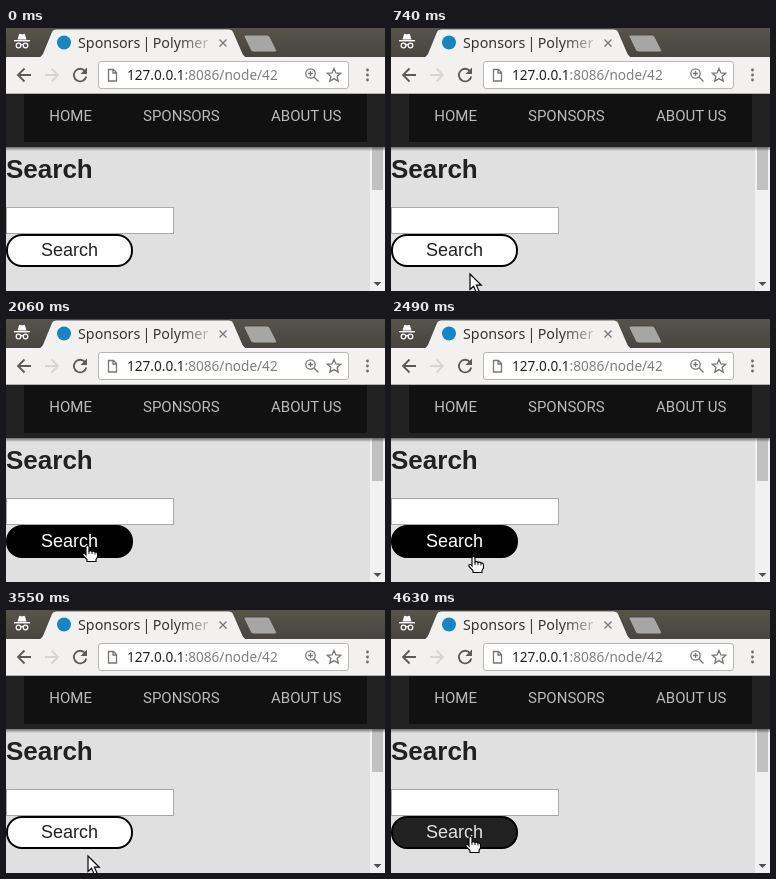
An HTML page for the animation above (4730 ms loop, 379x263 px).

```html
<!DOCTYPE html>
<html lang="en">
<head>
<meta charset="utf-8">
<title>Search button hover</title>
<style>
  html, body { margin: 0; width: 100%; height: 100%; overflow: hidden; background: #e0e0e0; }
  svg { display: block; width: 379px; height: 263px; }
  .ui { font-family: "Noto Sans", "Open Sans", sans-serif; }
  .title { font-size: 14.3px; word-spacing: -1.5px; }
  .nav { font: 15px Roboto, sans-serif; font-kerning: none; fill: #bbb; }
  .page { font-family: "Liberation Sans", Arial, sans-serif; }
  .icon { fill: none; stroke: #5a5a5a; stroke-width: 1.8; }
  .thin { stroke: #777; stroke-width: 1.3; }
  .off { stroke: #d6d5d4; }
</style>
</head>
<body>
<svg viewBox="0 0 379 263">
  <defs>
    <linearGradient id="bar" x2="0" y2="1">
      <stop stop-color="#57544b"/><stop offset="1" stop-color="#48453f"/>
    </linearGradient>
    <linearGradient id="titleFade" gradientUnits="userSpaceOnUse" x1="172" x2="206">
      <stop stop-color="#333"/><stop offset="1" stop-color="#333" stop-opacity=".15"/>
    </linearGradient>
    <linearGradient id="shadow" x2="0" y2="1">
      <stop stop-opacity=".5"/><stop offset="1" stop-opacity="0"/>
    </linearGradient>
  </defs>

  <!-- Window bar and tabs -->
  <rect width="379" height="29" fill="url(#bar)"/>
  <g transform="translate(0 1)">
    <path d="M11.5 10.500 13 5.500Q13.500 4.500 14.700 5L16 5.500 17.300 5Q18.500 4.500 19 5.500L20.500 10.500Z" fill="#fff"/>
    <rect x="8" y="11" width="16" height="1.400" fill="#fff"/>
    <g fill="none" stroke="#fff" stroke-width="1.300">
      <circle cx="12.500" cy="16.500" r="2.300"/><circle cx="19.500" cy="16.500" r="2.300"/>
      <path d="M14.800 16Q16 15 17.200 16"/>
    </g>
  </g>
  <path d="M238 8.500Q238 7 240 7H261Q263 7 264 9L270 21Q271.500 24 269 24H248Q245.500 24 244.500 22Z" fill="#a6a6a3" stroke="#44413b" stroke-width=".8"/>
  <path d="M31 30Q35 29 36.500 26L45.500 4Q47 1 50 1H223Q226 1 227.500 4L237 26Q238.500 29 242 30Z" fill="#f2f1f0" stroke="#3a3833" stroke-width=".8"/>
  <circle cx="58" cy="14.500" r="7" fill="#1685c4"/>
  <text class="ui title" x="72" y="19.500" fill="url(#titleFade)">Sponsors | Polymer</text>
  <path class="icon thin" d="M213.500 11.500 220.500 18.500M220.500 11.500 213.500 18.500"/>

  <!-- Toolbar -->
  <rect y="29" width="379" height="36" fill="#f2f1f0"/>
  <rect y="65" width="379" height="1" fill="#b5b2ad"/>
  <path class="icon" d="M25 47H12.500M18.500 40.500 12 47 18.500 53.500"/>
  <path class="icon off" d="M39 47H51.500M45.500 40.500 52 47 45.500 53.500"/>
  <path class="icon" d="M79 43A6.300 6.300 0 1 0 80.300 48.500"/>
  <path d="M81 39.500V46H74.500Z" fill="#5a5a5a"/>
  <rect x="92.500" y="33.500" width="250" height="27" rx="2.500" fill="#fff" stroke="#b9b6b2"/>
  <path class="icon thin" d="M102.500 41.500H107.500L110.500 44.500V53H102.500ZM107 42V45H110"/>
  <text class="ui" x="121" y="52" font-size="13.600" fill="#222">127.0.0.1<tspan fill="#808080">:8086/node/42</tspan></text>
  <g class="icon thin">
    <circle cx="304.500" cy="45.500" r="4.700"/>
    <path d="M308 49 312.500 53.500M302 45.500H307M304.500 43V48"/>
    <path d="M328 40.500 329.900 44.900 334.700 45.300 331.100 48.400 332.200 53.100 328 50.600 323.800 53.100 324.900 48.400 321.300 45.300 326.100 44.900Z"/>
  </g>
  <g fill="#6a6a6a">
    <circle cx="361.500" cy="42" r="1.400"/><circle cx="361.500" cy="47" r="1.400"/><circle cx="361.500" cy="52" r="1.400"/>
  </g>

  <!-- Page -->
  <rect y="66" width="379" height="197" fill="#e0e0e0"/>
  <rect x="364" y="119" width="15" height="144" fill="#f1f1f1"/>
  <rect x="366" y="119" width="11" height="43" fill="#c1c1c1"/>
  <path d="M367.500 254H375.500L371.500 258Z" fill="#505050"/>
  <rect y="119" width="379" height="4" fill="url(#shadow)"/>
  <rect y="66" width="379" height="53" fill="#222"/>
  <rect x="18" y="66" width="343" height="48" fill="#111"/>
  <g class="nav">
    <text x="43.300" y="93">HOME</text><text x="137" y="93">SPONSORS</text><text x="265" y="93">ABOUT US</text>
  </g>
  <g class="page">
    <text y="150" font-size="26" font-weight="700" fill="#212121">Search</text>
    <rect x=".5" y="179.500" width="167" height="26" fill="#fff" stroke="#a9a9a9"/>
    <rect id="button" x="1" y="207" width="125" height="31" rx="15" stroke="#000" stroke-width="2"/>
    <text id="label" x="35" y="228" font-size="18">Search</text>
  </g>

  <!-- Pointers, each with its hot spot at 0,0 -->
  <path id="arrow" d="M0 0V15.500L3.600 12.200 6.200 18.300 9 17.100 6.400 11.200H11.300Z" fill="#fff" stroke="#000" stroke-width="1.200"/>
  <g id="hand" stroke="#000">
    <path d="M-2 8V1Q-2 -.5 -.5 -.5T1 1V5Q3 4 4 5.500 6 4.500 7 6 9 5.500 9.500 7.500V11L8 13.500V15.500H-1V13.500L-5 9.500Q-5.500 7.500 -4 7.500 -3 7.500 -2 9Z" fill="#fff" stroke-width="1.100"/>
    <path d="M1 5V8M4 5.500V8M7 6V8.500" stroke-width=".9"/>
  </g>
</svg>
<script>
const LOOP = 4730, STEP = 40, FADE = 120;
const LOW = 246, HIGH = 227;

// Start and end of each pointer move; they alternate up onto the button and down off it.
const moves = [
  [210, 400], [450, 690], [870, 1150], [1326, 1680], [1860, 2060], [2280, 2600],
  [2795, 2965], [3200, 3500], [3680, 3850], [4060, 4350], [4519, 4620]
];

const [button, label, arrow, hand] =
  ["button", "label", "arrow", "hand"].map(id => document.getElementById(id));
const clamp = p => Math.min(1, Math.max(0, p));
const mix = (a, b, p) => a + (b - a) * p;
const smooth = p => p * p * (3 - 2 * p);
const easeOut = p => 1 - (1 - p) ** 2.3;
const gray = v => `rgb(${Array(3).fill(Math.round(v))})`;

// Height of the pointer (0 low, 1 high), whether it is over the button, and how dark that is
function stateAt(t) {
  let height = 0, over = false, dark = 0;
  moves.forEach(([start, end], i) => {
    if (t < start) return;
    const up = i % 2 === 0;
    const progress = smooth(clamp((t - start) / (end - start)));
    height = up ? progress : 1 - progress;
    const crossing = mix(start, end, up ? .3 : .7);
    if (t < crossing) return;
    over = up;
    dark = mix(dark, up ? 1 : 0, easeOut(clamp((t - crossing) / FADE)));
  });
  return { height, over, dark };
}

function draw(now) {
  const offset = STEP / 2;
  const t = Math.floor((now % LOOP - offset) / STEP) * STEP + offset;
  const { height, over, dark } = stateAt(t);
  button.setAttribute("fill", gray(mix(255, 0, dark)));
  label.setAttribute("fill", gray(mix(34, 255, dark)));

  const x = 81 + 2 * Math.cos((t - 2900) / LOOP * 2 * Math.PI);
  const place = `translate(${Math.round(x)} ${Math.round(mix(LOW, HIGH, height))})`;
  const shown = t >= moves[0][0];
  for (const [pointer, visible] of [[arrow, shown && !over], [hand, shown && over]]) {
    pointer.setAttribute("transform", place);
    pointer.style.display = visible ? "" : "none";
  }
  requestAnimationFrame(draw);
}
draw(0);
</script>
</body>
</html>
```
